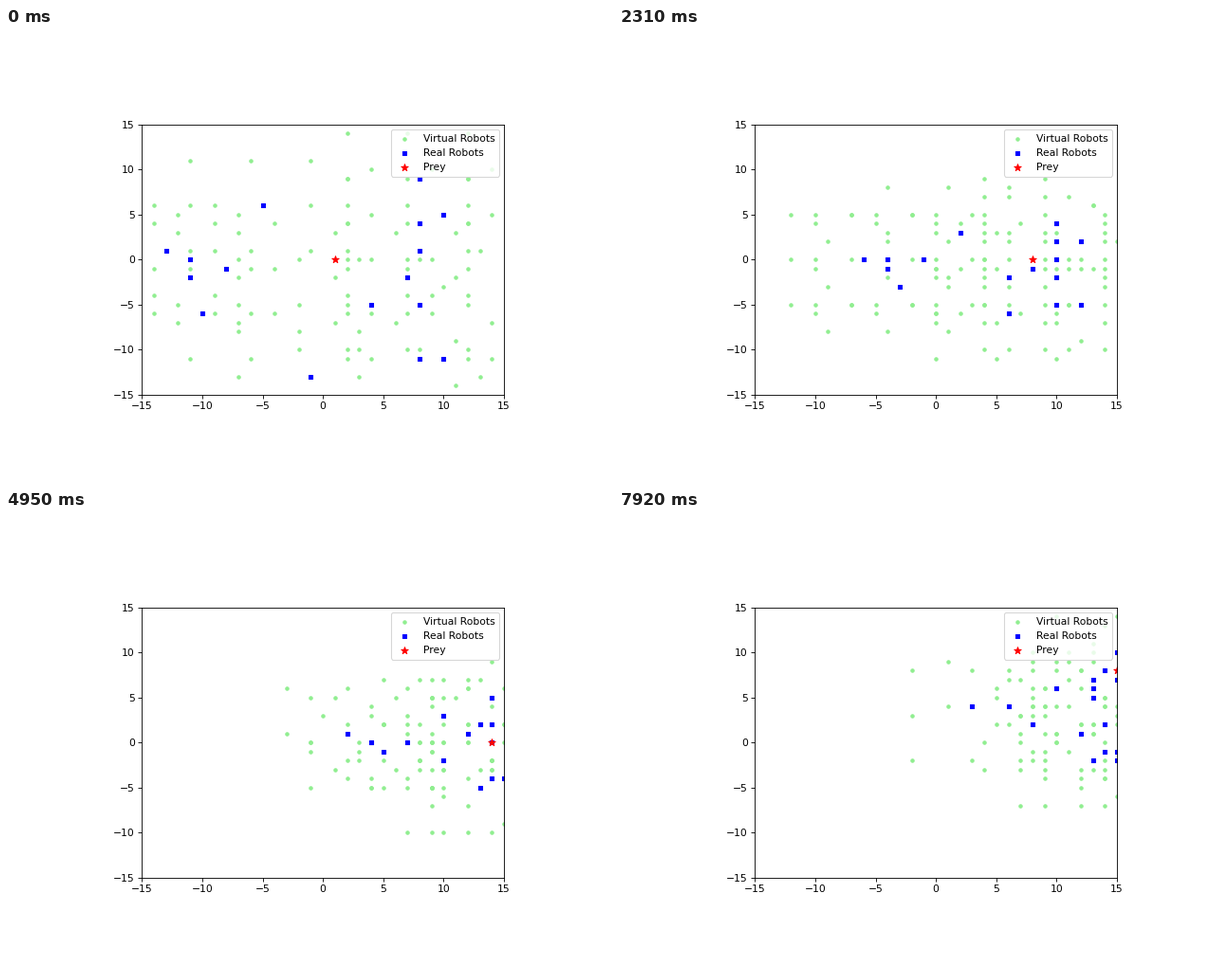
Recreate the animation shown at these times as a matplotlib script. Size 640 by 480 pixels, loop 8 s.

```python
import numpy as np
import matplotlib.pyplot as plt
from matplotlib.animation import FuncAnimation

LOOP, HOLD, TICK = 8000, 330, 40   # ms
STEPS = LOOP // HOLD + 1
REACH, WALL, TURN = 5, 15, 13      # cells, cells, step at which the climb begins
SHRINK = 0.77                      # the plot fills this part of a normal one
SCALE = SHRINK * 100 / 80          # point sizes at this figure's dpi

starts = np.array([(-13, 1), (-11, 0), (-11, -2), (-10, -6), (-8, -1), (-5, 6),
                   (-1, -13), (4, -5), (7, -2), (8, 9), (8, 4), (8, 1),
                   (10, 5), (8, -5), (8, -11), (10, -11)])
ends = np.array([(3, 4), (8, 2), (6, 4), (10, 6), (12, 1), (13, 6),
                 (13, -2), (14, -1), (15, 7), (15, 10), (13, 5), (13, 7),
                 (14, 2), (14, 8), (15, -2), (15, -1)])
ring = REACH * np.array([(i, j) for i in (-1, 0, 1) for j in (-1, 0, 1) if i or j])


def prey_at(step):
    """East with a short rest, then up along the wall."""
    x = 1 + step - np.clip(step - 10, 0, 2)
    return min(x, WALL), max(0, step - 16)


def robots_at(step):
    """Rear robots chase at full pace, front ones wait; all close in, then climb."""
    x0, y0 = starts.T
    x1, y1 = ends.T
    run = np.where(x0 < prey_at(0)[0], step, max(step - 4, 0) / 2)
    x = np.minimum(x0 + run, x1)
    climb = max(step - TURN, 0) / (STEPS - 1 - TURN)
    y = y0 * max(1 - step / 10, 0.45)
    y += (y1 - y) * climb
    return np.rint(np.column_stack([x, y]))


def scouts_at(step):
    """Eight virtual robots round each robot's last cell; some stray inwards."""
    rng = np.random.default_rng(step)
    robots = robots_at(step)
    late = step > TURN
    steps = np.array([(1, 0), (0, 1), (0, 0)])
    last = robots - (steps[rng.integers(0, 3, len(robots))] if late else steps[0])
    offsets = np.tile(ring, (len(robots), 1))
    dots = np.repeat(last, len(ring), axis=0) + offsets
    stray = (late | (dots[:, 0] >= 11)) & (rng.random(len(dots)) < 0.5)
    inward = np.sign(offsets) * rng.integers(0, 4, dots.shape)
    return dots - inward * stray[:, None]


scenes = [(scouts_at(s), robots_at(s), [prey_at(s)]) for s in range(STEPS)]

plt.rcParams.update({
    "font.size": 10 * SCALE,
    "axes.linewidth": 0.8 * SCALE,
    "lines.linewidth": 1.5 * SCALE,
    "patch.linewidth": SCALE,
})
for axis in ("xtick", "ytick"):
    plt.rcParams.update({f"{axis}.major.size": 3.5 * SCALE,
                         f"{axis}.major.width": 0.8 * SCALE,
                         f"{axis}.major.pad": 3.5 * SCALE})

fig = plt.figure(figsize=(8, 6), dpi=80)
ax = fig.add_axes([0.1275 + 0.125 * SHRINK, 0.11 + 0.11 * SHRINK,
                   0.775 * SHRINK, 0.77 * SHRINK])
ax.set(xlim=(-WALL, WALL), ylim=(-WALL, WALL))
ax.set_xticks(range(-WALL, WALL + 1, 5))
ax.set_yticks(range(-WALL, WALL + 1, 5))


def layer(size, color, marker, label):
    return ax.scatter([], [], s=size * SCALE ** 2, c=color, marker=marker, label=label)


layers = [layer(10, "lightgreen", "o", "Virtual Robots"),
          layer(20, "blue", "s", "Real Robots"),
          layer(50, "red", "*", "Prey")]
ax.legend(loc="upper right")


def draw(i):
    step = min((i * TICK + TICK - 1) // HOLD, STEPS - 1)
    for dots, places in zip(layers, scenes[step]):
        dots.set_offsets(places)
    return layers


anim = FuncAnimation(fig, draw, frames=LOOP // TICK, interval=TICK,
                     repeat=True, repeat_delay=0)
plt.show()
```
